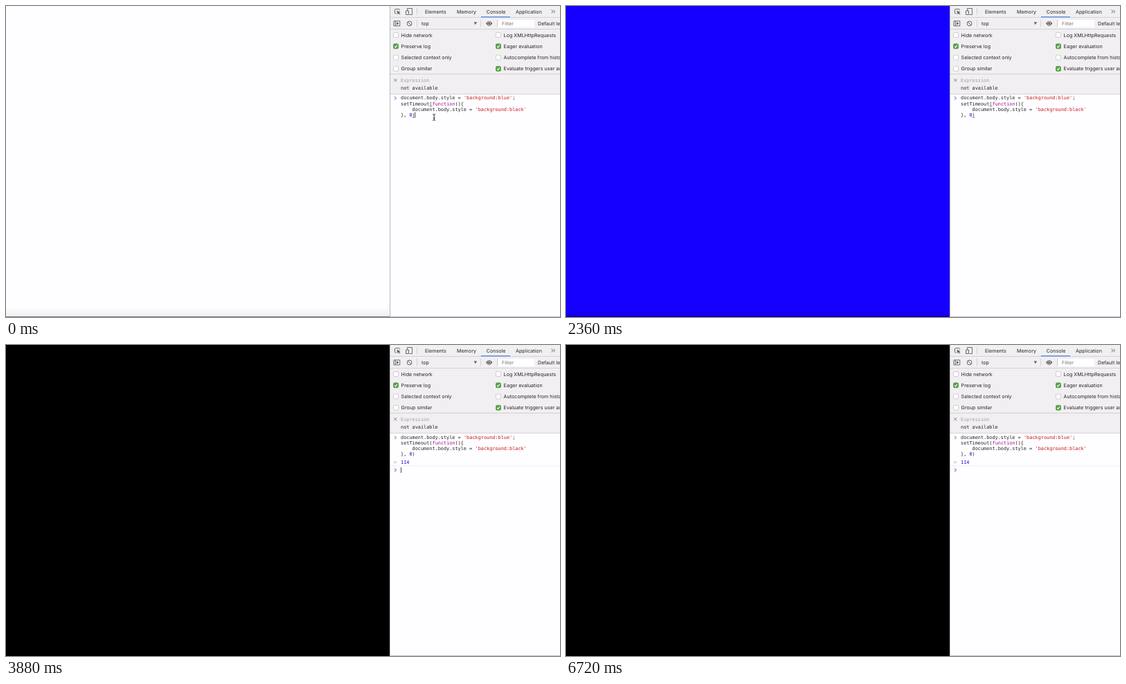
An HTML page with a canvas for the animation above (6.84 s loop, 800 by 450 pixels).

```html
<!DOCTYPE html>
<html lang="en">
<head>
<meta charset="utf-8">
<title>Console timeout demo</title>
<style>
  html, body { margin: 0; width: 100%; height: 100%; overflow: hidden; }
  canvas { display: block; width: 800px; height: 450px; }
</style>
</head>
<body>
<canvas id="stage" width="800" height="450"></canvas>
<script>
const ctx = document.getElementById('stage').getContext('2d');
const LOOP = 6840, RUN = 2360, TIMEOUT = 2720, RESULT = 2800;
const BLINKS = [40, 520, 1000, 1520, 2000, TIMEOUT, 3360, 3880, 4360, 4880, 5400, 5880, 6360];
const UI = '7.15px Inter, sans-serif';
const MONO = '6.87px "DejaVu Sans Mono", monospace';
const CHAR = 4.136, LINE = 8.1, LEFT = 570;
const INK = '#242426', ICON = '#5c5d60', RULE = '#cbcacc', PANEL = '#f1eff2';
const PAPER = '#fefdff', KEYWORD = '#a8108f', STRING = '#c41a16', NUMBER = '#1c10c8', BLUE = '#2b72d6';

const CODE = [
  [['document.body.style = ', INK], ["'background:blue'", STRING], [';', INK]],
  [['setTimeout(', INK], ['function', KEYWORD], ['(){', INK]],
  [['    document.body.style = ', INK], ["'background:black'", STRING]],
  [['}, ', INK], ['0', NUMBER], [')', INK]]
];

function rect(x, y, w, h, color) {
  ctx.fillStyle = color;
  ctx.fillRect(x, y, w, h);
}

function text(str, x, y, color = INK, font = UI) {
  ctx.font = font;
  ctx.fillStyle = color;
  ctx.fillText(str, x, y);
}

function stroke(d, color = ICON, width = 1) {
  ctx.strokeStyle = color;
  ctx.lineWidth = width;
  ctx.stroke(new Path2D(d));
}

function fill(d, color = ICON) {
  ctx.fillStyle = color;
  ctx.fill(new Path2D(d));
}

function checkbox(x, y, label, on) {
  ctx.beginPath();
  ctx.roundRect(x + .5, y - 3.5, 7, 7, 1.5);
  ctx.fillStyle = on ? '#55a143' : '#fff';
  ctx.fill();
  ctx.strokeStyle = on ? '#4b923b' : '#bdbcbe';
  ctx.lineWidth = .7;
  ctx.stroke();
  if (on) stroke(`M${x + 2.2} ${y + .2}l1.4 1.6 2.3 -3.6`, '#fff', 1.1);
  text(label, x + 11.6, y + 2.6);
}

function chevron(y, color) {
  stroke(`M561 ${y - 2.2}l2.7 2.2 -2.7 2.2`, color, 1);
}

function toolbar() {
  rect(555, 0, 245, 127, PANEL);
  for (const y of [16, 33, 98, 127]) rect(555, y, 245, .8, RULE);
  for (const [x, y] of [[593, 3], [593, 20], [685, 20], [709, 20]]) rect(x, y, .8, 10, RULE);

  // Element picker and device switch
  stroke('M564 11H562.5Q561.5 11 561.5 10V5.5Q561.5 4.5 562.5 4.5H567.5Q568.5 4.5 568.5 5.5V6.5', ICON, .9);
  fill('M564.3 6.8L569.6 9 567.6 9.8 569.3 11.7 568.4 12.5 566.8 10.6 565.7 12.4Z');
  stroke('M579.5 7V3.5H586.5V12.5H582.5M577.5 7H581.5V12.5H577.5Z', ICON, .9);
  [['Elements', 605], ['Memory', 651], ['Console', 693.7], ['Application', 736]]
    .forEach(([name, x]) => text(name, x, 10.7));
  rect(686, 15.3, 42, 1.2, '#3b7de0');
  stroke('M787.5 5.6l2.3 2.4 -2.3 2.4M790.4 5.6l2.3 2.4 -2.3 2.4', ICON, .9);

  // Console controls
  stroke('M560 21.8H568.8V28.8H560ZM562.3 21.8V28.8', ICON, .9);
  fill('M564 23.2L567.5 25.3 564 27.4Z');
  stroke('M579.2 25.4a3.4 3.4 0 1 0 6.8 0a3.4 3.4 0 1 0 -6.8 0M580.2 23L585 27.8', ICON, 1);
  text('top', 600, 27.8);
  fill('M675.7 23.2H680L677.85 27.2Z');
  fill('M693 25.3Q697.7 18.6 702.4 25.3Q697.7 32 693 25.3Z');
  stroke('M695.7 25.3a2 2 0 1 0 4 0a2 2 0 1 0 -4 0', PANEL, .8);
  rect(711, 20, 52, 11, PAPER);
  text('Filter', 716, 27.9, '#757477');
  text('Default levels', 768, 27.7);

  [['Hide network', 0], ['Preserve log', 1], ['Selected context only', 0], ['Group similar', 0],
   ['Log XMLHttpRequests', 0], ['Eager evaluation', 1], ['Autocomplete from history', 0],
   ['Evaluate triggers user activation', 1]]
    .forEach(([label, on], i) => checkbox(i < 4 ? 559 : 707, 42 + i % 4 * 16.25, label, on));

  stroke('M560.3 105.3l4 4M564.3 105.3l-4 4', '#717073', .9);
  text('Expression', LEFT, 109.7, '#a09fa2', MONO);
  text('not available', LEFT, 121.2, INK, MONO);
}

function code(y) {
  CODE.forEach((parts, row) => {
    let col = 0;
    for (const [str, color] of parts) {
      text(str, LEFT + col * CHAR, y + row * LINE, color, MONO);
      col += str.length;
    }
  });
}

function consoleLog(t) {
  const caret = BLINKS.filter(b => b <= t).length % 2 === 0;
  if (t < TIMEOUT) {
    chevron(133.3, BLUE);
    code(135.4);
    rect(LEFT + 10 * CHAR, 144.6, CHAR, .8, '#777');
    rect(LEFT + 4 * CHAR, 160.9, CHAR, .8, '#777');
    if (caret) rect(590.4, 153.5, .8, 8, '#222');
    return;
  }
  const done = t >= RESULT, y = done ? 181 : 169.5;
  chevron(134, '#7d7c80');
  code(136);
  if (done) {
    stroke('M562.8 167.8l-2.2 1.8 2.2 1.8', '#99989b', .8);
    rect(563.4, 169.1, 1, 1, '#99989b');
    text('114', LEFT, 171.8, NUMBER, MONO);
  }
  rect(555, y - 6.3, 245, .8, '#eae9ec');
  chevron(y, '#4a50c8');
  if (caret) rect(LEFT, y - 4, .8, 8, '#222');
}

function page(t) {
  rect(0, 0, 554, 450, t < RUN ? PAPER : t < TIMEOUT ? '#1500ff' : '#000');
  const shade = ctx.createLinearGradient(0, 436, 0, 449);
  shade.addColorStop(0, '#0000');
  shade.addColorStop(1, '#0000000f');
  rect(0, 436, 554, 13, shade);
  rect(0, 449, 554, 1, '#00000080');
  rect(554, 0, 1, 450, '#b9b8bb');
}

function draw(now) {
  const t = now % LOOP;
  rect(0, 0, 800, 450, PAPER);
  page(t);
  toolbar();
  consoleLog(t);
  rect(555, 449, 245, 1, '#c3c2c5');
  if (t < 40) stroke('M616.2 156.5Q618.2 156.5 618.2 158V164Q618.2 165.5 616.2 165.5M620.2 156.5Q618.2 156.5 618.2 158M618.2 164Q618.2 165.5 620.2 165.5M617 162.2H619.4', '#222', .9);
}

ctx.textRendering = 'geometricPrecision';
const start = performance.now();
function tick() {
  draw(performance.now() - start);
  requestAnimationFrame(tick);
}
tick();
</script>
</body>
</html>
```
